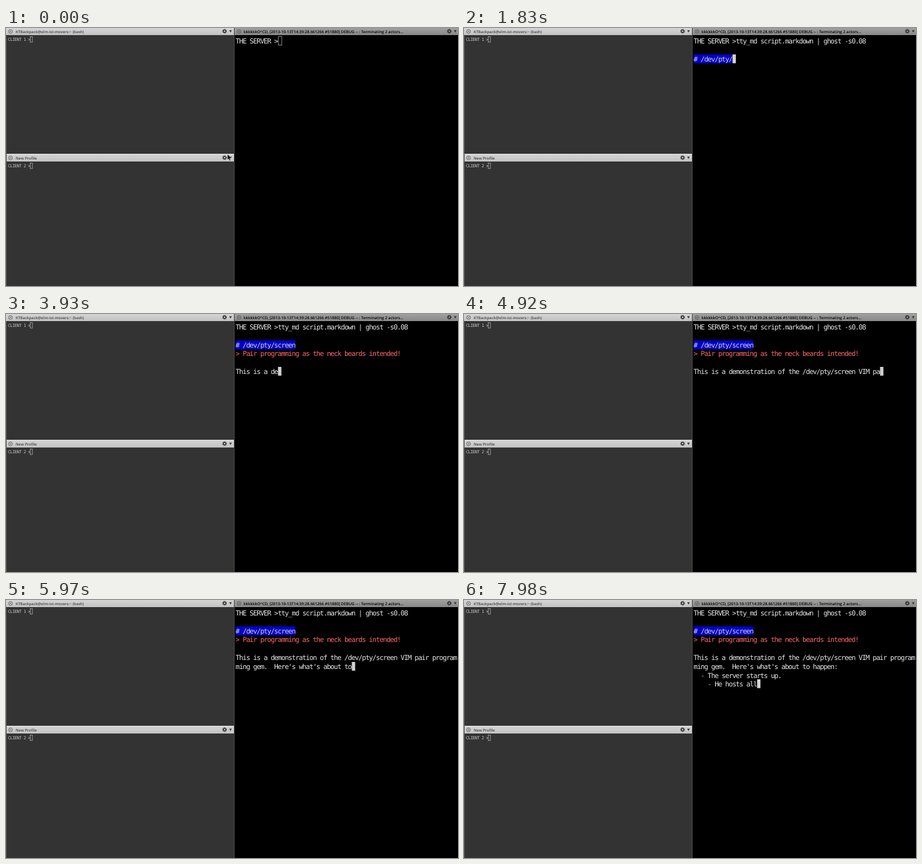
Recreate the animation shown at these times as an HTML page. Size 700 by 400 pixels, loop 8000 ms.

```html
<!DOCTYPE html>
<html lang="en">
<head>
<meta charset="utf-8">
<title>Terminal session</title>
<style>
  html, body { margin: 0; width: 100%; height: 100%; overflow: hidden; background: #000; }
  svg { display: block; }
  text { white-space: pre; text-rendering: geometricPrecision; font-kerning: none; font-variant-ligatures: none; }
  .term { font: 10.7px "DejaVu Sans Mono", monospace; letter-spacing: -1px; fill: #e6e6e6; }
  .client { font: 6.6px "DejaVu Sans Mono", monospace; letter-spacing: -.52px; fill: #c4c4c4; }
  .title { font: 600 5.9px "Open Sans", sans-serif; fill: #444; }
  .active { font-size: 6.1px; fill: #000; }
  .hollow { fill: none; stroke: #a8a8a8; stroke-width: .8; }
</style>
</head>
<body>
<svg width="700" height="400" viewBox="0 0 700 400">
  <defs>
    <linearGradient id="light" x2="0" y2="1">
      <stop stop-color="#d4d4d4"/><stop offset="1" stop-color="#c3c3c3"/>
    </linearGradient>
    <linearGradient id="dark" x2="0" y2="1">
      <stop stop-color="#a0a0a0"/><stop offset="1" stop-color="#888"/>
    </linearGradient>
    <g id="close" fill="none" stroke="#4c4c4c" stroke-width=".7">
      <circle r="3"/><path d="M-1.2-1.2 1.2 1.2M1.2-1.2-1.2 1.2"/>
    </g>
    <g id="menu">
      <circle r="2" fill="none" stroke="#303030" stroke-width="1.5"/>
      <circle r="3.1" fill="none" stroke="#303030" stroke-width="1" stroke-dasharray="1.217 1.217"/>
      <path d="M7.2-1.6h4l-2 3.6z" fill="#303030"/>
    </g>
  </defs>

  <rect width="353" height="400" fill="#333"/>
  <rect width="353" height="11" fill="url(#light)"/>
  <rect y="195" width="353" height="12" fill="url(#light)"/>
  <rect y="195" width="353" height="1" fill="#e2e2e2"/>
  <rect y="12" width="1" height="388" fill="#555"/>
  <rect x="354" width="346" height="11" fill="url(#dark)"/>
  <rect x="353" width="1" height="400" fill="#484848"/>

  <use href="#close" x="7" y="5.3"/>
  <use href="#close" x="7" y="201.3"/>
  <use href="#close" x="361" y="5.3"/>
  <use href="#menu" x="338.5" y="5"/>
  <use href="#menu" x="338.5" y="201"/>
  <use href="#menu" x="686.5" y="5"/>
  <text class="title" x="15" y="7.6">KTBackpack@elm-ist-movers:~ (bash)</text>
  <text class="title" x="15" y="203.6">New Profile</text>
  <text class="title active" x="368" y="7.6">kkkkkkO^CD, [2013-10-13T14:39:28.661266 #51880] DEBUG -- : Terminating 2 actors...</text>

  <text class="client" x="3" y="20">CLIENT 1 &gt;</text>
  <text class="client" x="3" y="216">CLIENT 2 &gt;</text>
  <rect class="hollow" x="37.5" y="13.3" width="3.4" height="8.6"/>
  <rect class="hollow" x="37.5" y="209.3" width="3.4" height="8.6"/>

  <rect id="band" x="355.7" y="41" height="13.7" fill="#0000c8"/>
  <g id="screen"></g>
  <rect id="cursor" width="5.2" height="13.6" fill="#d2d2d2"/>
  <path id="pointer" d="M343 195.5v9l2-1.8 1.5 3.3 1.5-.7-1.5-3.2h2.7z" fill="#000" stroke="#ddd" stroke-width=".6"/>
</svg>
<script>
  const LOOP = 8000, STEP = 30, RATE = 24.3;
  const LEFT = 356, TOP = 13, CELL = 5.44, LINE = 13.8;
  const RED = '#ff6868', YELLOW = '#f0c020', PALE = '#d4d4e4';

  const rowTop = row => Math.round(TOP + row * LINE);

  // Typed runs: start ms, row, column, text, colour, ms per character
  const runs = [
    [-9999, 0, 0, 'THE SERVER >'],
    [30, 0, 12, 'tty_md script.markdown | ghost -s0.08', , 20],
    [860, 1, 0, ''],
    [1350, 2, 0, ''],
    [1555, 2, 0, '# /dev/pty/screen', PALE],
    [1993, 3, 0, ''],
    [2342, 3, 0, '> Pair programming as the neck beards intended!', RED],
    [3508, 4, 0, ''],
    [3560, 5, 0, ''],
    [3625, 5, 0, 'This is a demonstration of the /dev/pty/screen VIM pair program'],
    [5156, 6, 0, "ming gem.  Here's what's about to happen:"],
    [6180, 7, 0, ''],
    [6300, 7, 0, '  '],
    [6470, 7, 2, '-', YELLOW],
    [6620, 7, 3, ' The server starts up.'],
    [7180, 8, 0, ''],
    [7320, 8, 0, '    '],
    [7510, 8, 4, '-', YELLOW],
    [7657, 8, 5, ' He hosts all']
  ].map(([start, row, col, text, color, rate = RATE]) => {
    const el = document.createElementNS('http://www.w3.org/2000/svg', 'text');
    el.setAttribute('class', 'term');
    el.setAttribute('x', LEFT - .4 + col * CELL);
    el.setAttribute('y', rowTop(row) + 10.7);
    if (color) el.style.fill = color;
    document.getElementById('screen').append(el);
    return { start, row, col, text, rate, el };
  });

  const cursor = document.getElementById('cursor');
  const band = document.getElementById('band');
  const pointer = document.getElementById('pointer');
  const heading = runs.find(run => run.text.startsWith('#'));

  const typed = (run, t) =>
    Math.max(0, Math.min(run.text.length, Math.floor((t - run.start) / run.rate)));

  function draw(t) {
    let last;
    for (const run of runs) {
      run.el.textContent = run.text.slice(0, typed(run, t));
      if (t >= run.start) last = run;
    }
    const focused = t >= STEP;
    cursor.setAttribute('x', LEFT + (last.col + typed(last, t)) * CELL + (focused ? 0 : .5));
    cursor.setAttribute('y', rowTop(last.row));
    cursor.setAttribute('class', focused ? '' : 'hollow');
    band.setAttribute('width', typed(heading, t) * CELL);
    pointer.style.display = focused ? 'none' : '';
  }

  function tick() {
    const t = performance.now() % LOOP;
    draw(Math.floor(t / STEP) * STEP);
    requestAnimationFrame(tick);
  }
  tick();
</script>
</body>
</html>
```
